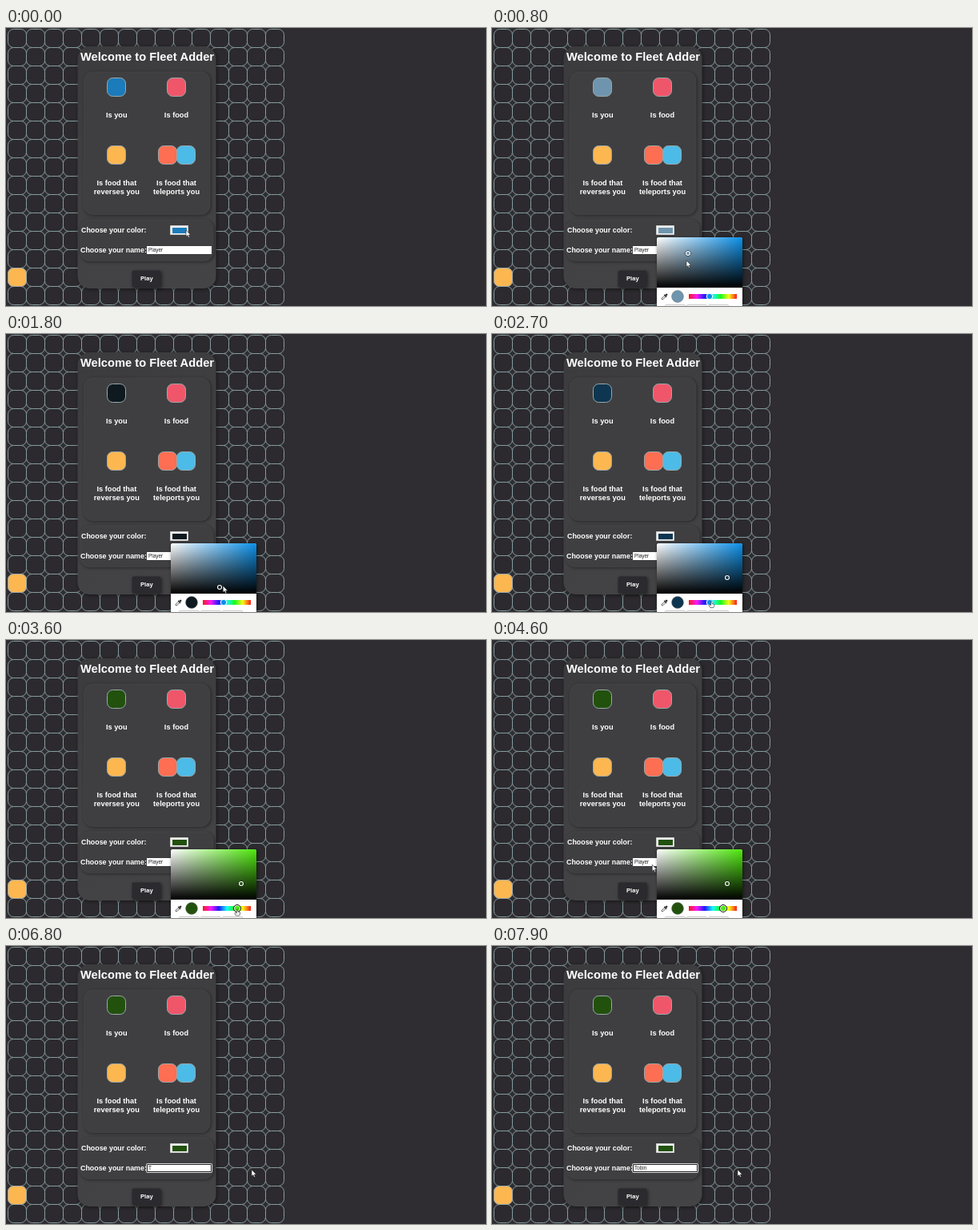
Write an HTML page with a canvas that moves like this. It is 600 px wide and 348 px high and loops after 8000 ms.

```html
<!DOCTYPE html>
<html lang="en">
<head>
<meta charset="utf-8">
<title>Snake menu</title>
<style>
  html, body { margin: 0; width: 100%; height: 100%; overflow: hidden; background: #2f2d31; }
  canvas { display: block; }
</style>
</head>
<body>
<canvas id="stage" width="600" height="348"></canvas>
<script>
const ctx = document.getElementById('stage').getContext('2d');
const LOOP = 8000, STEP = 100, CELL = 23.05;
const OPEN = 300, DRAG = 700, RELEASE = 2200, HUE_DRAG = 2800, HUE_RELEASE = 3600, CLOSE = 4900;
const ERASE = 5900, TYPE = 6800, LAG = 100;
const FIRST = 'Player', SECOND = 'Tobin';
const LINE = '#869da0', YELLOW = '#fdb750';
const AREA = { x: 206, y: 262, w: 107, h: 63 };
const HUE = { x: 246, y: 333, w: 60, h: 6 };
const START = { x: 297, y: 279, hueX: 272 };

// Places where the mouse turns or rests: [time, x, y].
const turns = [
  [0, 225, 253], [OPEN, 226, 254], [DRAG, 245, 282], [800, 243, 291], [1700, 267, 317],
  [2100, 294, 305], [2300, 294, 305], [HUE_DRAG, START.hueX, 338], [HUE_RELEASE, 289, 337],
  [4000, 289, 337], [4700, 195, 278], [5100, 195, 278], [5500, 307, 280]
];

const clamp = (v, lo, hi) => Math.min(hi, Math.max(lo, v));

function mouse(t) {
  const i = turns.findIndex(p => p[0] > t);
  if (i < 0) return turns.at(-1).slice(1);
  const [t0, x0, y0] = turns[i - 1], [t1, x1, y1] = turns[i];
  const k = (t - t0) / (t1 - t0), ease = k * k * (3 - 2 * k);
  return [x0 + (x1 - x0) * ease, y0 + (y1 - y0) * ease];
}

// The picker follows the mouse with a short delay while dragging.
function picked(t) {
  const [x, y] = t < DRAG + LAG ? [START.x, START.y] : mouse(Math.min(t - LAG, RELEASE));
  const hueX = t < HUE_DRAG ? START.hueX : mouse(Math.min(t, HUE_RELEASE))[0];
  const hue = 360 * (HUE.x + HUE.w - hueX) / HUE.w;
  const s = clamp((x - AREA.x) / AREA.w, 0, 1), v = clamp(1 - (y - AREA.y) / AREA.h, 0, 1);
  return { x, y, hueX, hue, color: hsv(hue, s, v) };
}

function hsv(h, s, v) {
  const l = v * (1 - s / 2);
  const sat = (v - l) / (Math.min(l, 1 - l) || 1);
  return `hsl(${h} ${sat * 100}% ${l * 100}%)`;
}

function box(x, y, w, h, r, fill, stroke, width = 1) {
  ctx.beginPath();
  ctx.roundRect(x, y, w, h, r);
  if (fill) { ctx.fillStyle = fill; ctx.fill(); }
  if (stroke) { ctx.strokeStyle = stroke; ctx.lineWidth = width; ctx.stroke(); }
}

function disc(x, y, r, fill, stroke, width) {
  box(x - r, y - r, 2 * r, 2 * r, r, fill, stroke, width);
}

function raised(x, y, w, h, r, fill, blur, offset) {
  ctx.save();
  ctx.shadowColor = 'rgba(0,0,0,.5)';
  ctx.shadowBlur = blur;
  ctx.shadowOffsetX = ctx.shadowOffsetY = offset;
  box(x, y, w, h, r, fill);
  ctx.restore();
}

function text(str, x, y, size, align = 'left', color = '#fff', weight = 'bold') {
  ctx.font = `${weight} ${size}px "Liberation Sans", Arial, sans-serif`;
  ctx.textAlign = align;
  ctx.fillStyle = color;
  ctx.fillText(str, x, y);
}

function gradient(x0, y0, x1, y1, colors) {
  const g = ctx.createLinearGradient(x0, y0, x1, y1);
  colors.forEach((c, i) => g.addColorStop(i / (colors.length - 1), c));
  return g;
}

// Snapped to whole pixels so that neighbours share one crisp line.
function tile(x, y, color, line = '#9aa9ab') {
  box(Math.floor(x) + .5, Math.floor(y) + .5, 23, 23, 7, color, line);
}

function board() {
  ctx.fillStyle = '#2f2d31';
  ctx.fillRect(0, 0, 600, 348);
  for (let row = 0; row < 15; row++)
    for (let col = 0; col < 15; col++)
      tile(2 + col * CELL, 1 + row * CELL, '#2c2a2e', LINE);
  tile(2, 1 + 13 * CELL, YELLOW);
}

function legend(color) {
  const items = [
    [[color], ['Is you']],
    [['#f0566a'], ['Is food']],
    [[YELLOW], ['Is food that', 'reverses you']],
    [['#fd6e52', '#4cbbe8'], ['Is food that', 'teleports you']]
  ];
  items.forEach(([colors, lines], i) => {
    const x = 138.3 + i % 2 * 74.7, y = 62.5 + Math.floor(i / 2) * 85.3;
    colors.forEach((c, n) => tile(x + (n - colors.length / 2) * 23, y, c));
    lines.forEach((line, n) => text(line, x, y + 49.5 + n * 10.5, 9.25, 'center'));
  });
}

function menu(color, name, focused) {
  raised(89.5, 23, 173, 303, 15, gradient(90, 23, 262, 326, ['#3b3b3d', '#414143', '#444446']), 5, 1);
  for (const [x, y, w, h] of [[97.5, 55, 157.5, 178.5], [93, 240, 166, 51.5]]) {
    raised(x, y, w, h, 11, '#3f3f41', 4, 1);
    box(x, y, w, h, 11, null, '#4b4b4d', .6);
  }
  text('Welcome to Fleet Adder', 93, 40.5, 14.7);
  legend(color);

  text('Choose your color:', 94, 256, 8.9);
  box(205.5, 247.5, 22, 11, 0, '#eee', '#ccc');
  box(208, 250, 18, 7, 0, color);
  text('Choose your name:', 93, 281, 8.9);
  box(176, 273, 81, 10, 0, '#fff');
  if (focused) {
    box(175.5, 272.5, 82, 11, 1, null, '#ddd');
    box(176.5, 273.5, 80, 9, 0, null, '#222');
  }
  text(name, 178, 280.3, 6.4, 'left', '#222', 'normal');

  raised(157.5, 303.5, 36, 21, 2, '#2b2a2e', 4, 1.5);
  text('Play', 175.8, 316, 7.6, 'center');
}

function picker({ x, y, hueX, hue, color }, hueFocused) {
  const pure = `hsl(${hue} 90% 48%)`, corners = [3, 3, 0, 0];
  const spectrum = Array.from({ length: 7 }, (_, i) => `hsl(${360 - i * 60} 95% 54%)`);
  raised(AREA.x, AREA.y, AREA.w, 100, 3, '#fff', 4, 1);
  box(AREA.x, AREA.y, AREA.w, AREA.h, corners, gradient(AREA.x, 0, AREA.x + AREA.w, 0, ['#fff', pure]));
  box(AREA.x, AREA.y, AREA.w, AREA.h, corners, gradient(0, AREA.y, 0, AREA.y + AREA.h, ['#0000', '#000']));
  disc(x, y, 3.3, null, '#111', .8);
  disc(x, y, 2.5, color, '#fff', 1.1);

  // Eyedropper
  ctx.save();
  ctx.translate(215.5, 336.5);
  ctx.rotate(Math.PI / 4);
  box(-1, -1.5, 2, 6, 1, '#fff', '#333', .8);
  box(-2.3, -2.3, 4.6, 1.2, .5, '#333');
  box(-1.3, -5, 2.6, 3, 1.2, '#333');
  ctx.restore();

  disc(232, 336, 7.5, color, '#777', .5);
  box(HUE.x, HUE.y, HUE.w, HUE.h, 0, gradient(HUE.x, 0, HUE.x + HUE.w, 0, spectrum));
  disc(hueX, 336, 3.7, pure, '#fff');
  if (hueFocused) disc(hueX, 336, 4.5, null, '#111');
  for (let i = 0; i < 3; i++) box(216.5 + i * 27, 346.6, 25, 8, 1, null, '#aaa', .7);
}

const arrow = new Path2D('M0 0V8.2L1.9 6.5 3.2 9.3 4.5 8.7 3.3 6H5.8Z');
const hand = new Path2D('M-.7 0Q0-.8.7 0V3L3.5 3.8V6L2.5 8H-1.5L-3.3 5-2.5 4.2-.7 5.2Z');

function pointer(shape, [x, y]) {
  ctx.save();
  ctx.translate(x, y);
  ctx.fillStyle = '#fff';
  ctx.strokeStyle = '#222';
  ctx.lineWidth = .6;
  ctx.fill(shape);
  ctx.stroke(shape);
  ctx.restore();
}

function typedName(t) {
  if (t < ERASE) return FIRST;
  if (t < TYPE) return FIRST.slice(0, Math.max(0, FIRST.length - 1 - Math.floor((t - ERASE) / 130)));
  return SECOND.slice(0, Math.floor((t - TYPE) / 180) + 1);
}

function draw(t) {
  const pick = picked(t);
  board();
  menu(pick.color, typedName(t), t >= CLOSE);
  if (t >= OPEN && t < CLOSE) picker(pick, t >= HUE_DRAG);
  pointer(t >= 2600 && t < 4200 ? hand : arrow, mouse(t));
}

let shown = -1;
function tick(now) {
  const t = Math.floor(now % LOOP / STEP) * STEP;
  if (t !== shown) draw(shown = t);
  requestAnimationFrame(tick);
}
draw(0);
requestAnimationFrame(tick);
</script>
</body>
</html>
```
